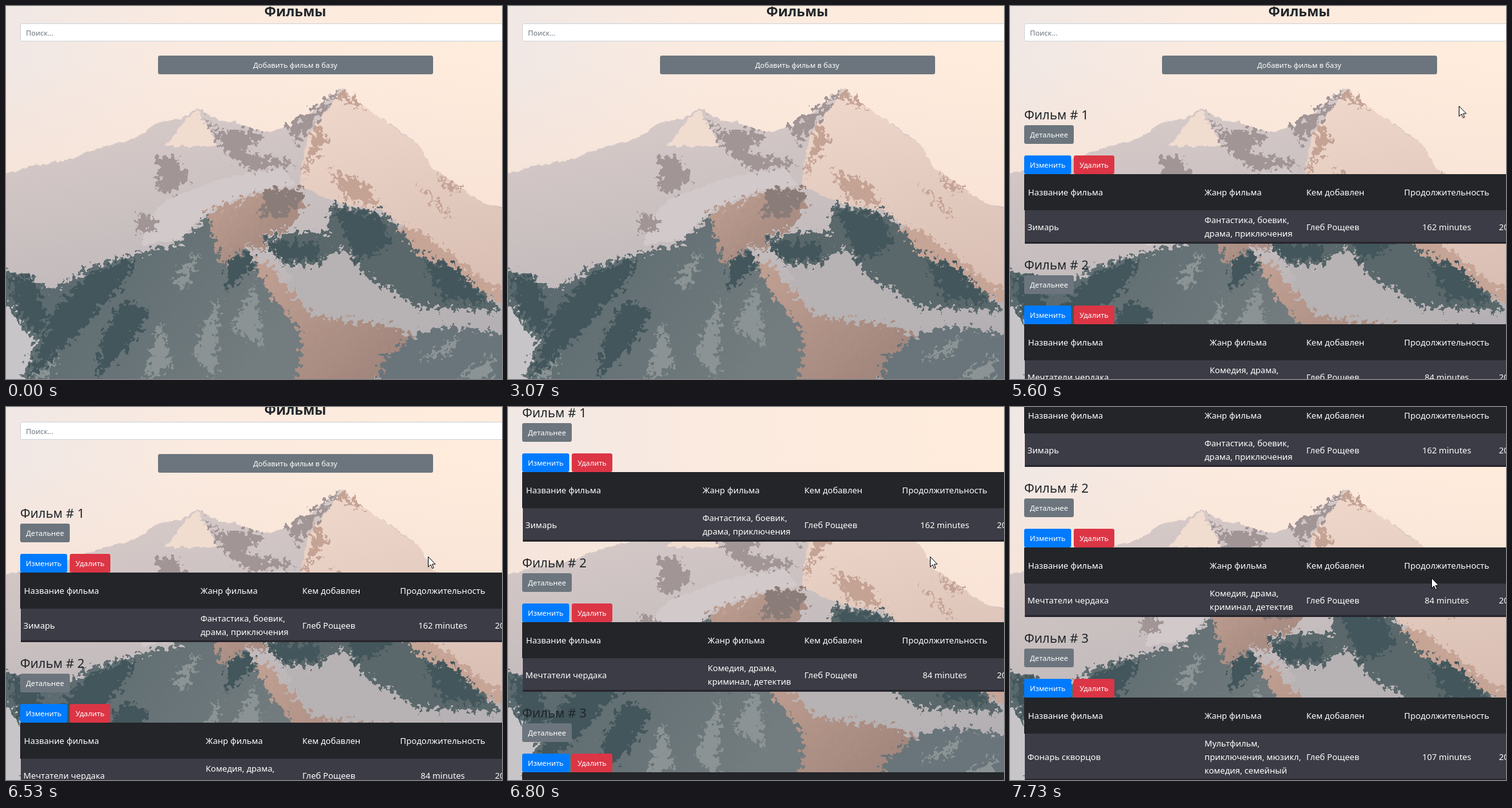
These frames come from a looping animation (770x579 px, 8 s). An HTML page:

```html
<!DOCTYPE html>
<html lang="ru">
<head>
<meta charset="utf-8">
<title>Фильмы</title>
<style>
  html, body { margin: 0; width: 100%; height: 100%; overflow: hidden; }
  body { position: relative; font: 13.1px/21px "Noto Sans", "Open Sans", sans-serif; background: #f7e8de; }
  #photo, #page, #cursor { position: absolute; left: 0; top: 0; }
  #photo { width: 770px; height: 579px; }
  #page { width: 770px; height: 900px; }
  #page, #list, #cursor { animation: 8s steps(1) -5ms infinite; }
  #page { animation-name: scroll; will-change: transform; }
  #list { animation-name: appear; }
  #cursor { animation-name: point; will-change: transform; }

  .film { position: absolute; left: 0; width: 100%; }
  .text, .box { position: absolute; white-space: nowrap; }
  .text { color: #fff; }
  .middle { transform: translate(-50%, -50%); }
  .side { transform: translateY(-50%); }
  .title { color: #212529; font-size: 21.2px; font-weight: 600; }
  .name { color: #212529; font-size: 19.6px; font-weight: 500; }
  .button { height: 29px; border-radius: 3px; color: #fff; font-size: 11.3px; line-height: 30.5px; text-align: center; }
  .grey { background: #6c757d; }
  .blue { background: #007bff; }
  .red { background: #dc3545; }
  .search { left: 22px; top: 27px; width: 800px; height: 26px; padding-left: 8px; border: 1px solid #ced4da;
    border-radius: 3px; background: #fff; color: #6c757d; font-size: 11.3px; line-height: 28px; }
  .head { left: 22px; top: 261px; width: 760px; height: 56px; background: #232529; }
  .row { left: 23px; top: 317px; width: 760px; background: #3b3c45; border-bottom: 3px solid #28262d; }

  @keyframes appear {
    0% { visibility: hidden; }
    55%, 100% { visibility: visible; }
  }
  @keyframes scroll {
    0%, 80.833% { transform: translateY(0); }
    81.667% { transform: translateY(-4px); animation-timing-function: steps(4); }
    85% { transform: translateY(-160px); animation-timing-function: steps(3); }
    87.5% { transform: translateY(-220px); animation-timing-function: steps(4); }
    90.833%, 100% { transform: translateY(-276px); }
  }
  @keyframes point {
    0% { transform: translate(790px, 600px); }
    1.667% { transform: translate(769px, 578px); }
    7.5% { transform: translate(769px, 578px); animation-timing-function: steps(6); }
    12.5% { transform: translate(735px, 520px); animation-timing-function: steps(7); }
    18.333% { transform: translate(694px, 454px); animation-timing-function: steps(5); }
    22.5% { transform: translate(664px, 340px); animation-timing-function: steps(8); }
    29.167% { transform: translate(752px, 420px); animation-timing-function: steps(2); }
    30.833% { transform: translate(720px, 453px); animation-timing-function: steps(4); }
    34.167% { transform: translate(667px, 300px); animation-timing-function: steps(5); }
    38.333% { transform: translate(772px, 133px); }
    63.333% { transform: translate(772px, 104px); animation-timing-function: steps(6); }
    68.333% { transform: translate(715px, 130px); animation-timing-function: steps(6); }
    73.333% { transform: translate(660px, 205px); }
    74.167% { transform: translate(660px, 205px); animation-timing-function: steps(2); }
    75.833% { transform: translate(657px, 212px); }
    77.5% { transform: translate(657px, 212px); animation-timing-function: steps(2); }
    79.167% { transform: translate(655px, 223px); }
    80.833% { transform: translate(655px, 232px); }
    87.5% { transform: translate(655px, 232px); animation-timing-function: steps(4); }
    90.833% { transform: translate(654px, 238px); animation-timing-function: steps(7); }
    96.667%, 100% { transform: translate(654px, 265px); }
  }
</style>
</head>
<body>
<svg id="photo" viewBox="0 0 770 579">
  <defs>
    <linearGradient id="sky">
      <stop offset="0" stop-color="#f0e8e5"/><stop offset=".4" stop-color="#fbeadf"/><stop offset="1" stop-color="#ffecdc"/>
    </linearGradient>
    <linearGradient id="haze" x2="0" y2="1">
      <stop offset=".15" stop-color="#f8e3d6" stop-opacity="0"/><stop offset=".55" stop-color="#f8e3d6"/>
    </linearGradient>
    <linearGradient id="snow" x2=".3" y2="1">
      <stop offset="0" stop-color="#ddcfcc"/><stop offset="1" stop-color="#b3afb3"/>
    </linearGradient>
    <linearGradient id="sunny" x2=".2" y2="1">
      <stop offset="0" stop-color="#f0d9cc"/><stop offset="1" stop-color="#d9bfb4"/>
    </linearGradient>
    <linearGradient id="rock" x2="1" y2=".4">
      <stop offset="0" stop-color="#536469"/><stop offset="1" stop-color="#737c7f"/>
    </linearGradient>
    <linearGradient id="warm" x2="1" y2="1">
      <stop offset="0" stop-color="#c2a193"/><stop offset="1" stop-color="#9a8078"/>
    </linearGradient>
    <filter id="crisp" x="-5%" y="-5%" width="110%" height="110%" color-interpolation-filters="sRGB">
      <feTurbulence type="fractalNoise" baseFrequency=".1" numOctaves="2" seed="4"/>
      <feDisplacementMap in="SourceGraphic" scale="8" xChannelSelector="R" yChannelSelector="G"/>
    </filter>
    <filter id="ragged" x="-5%" y="-5%" width="110%" height="110%" color-interpolation-filters="sRGB">
      <feTurbulence type="fractalNoise" baseFrequency=".13" numOctaves="3" seed="9"/>
      <feDisplacementMap in="SourceGraphic" scale="34" xChannelSelector="R" yChannelSelector="G"/>
    </filter>
  </defs>
  <rect width="770" height="579" fill="url(#sky)"/>
  <rect width="770" height="579" fill="url(#haze)"/>

  <g filter="url(#crisp)">
    <path fill="url(#snow)" d="M-20 266L40 248 90 240 140 222 200 206 235 181 272 175 297 159 330 178 355 180 400 197 440 186 470 168 490 150 522 127 548 150 575 170 605 188 640 215 660 250 700 278 740 306 790 316V600H-20Z"/>
    <path fill="url(#sunny)" d="M522 129L548 150 605 190 640 215 660 250 700 278 740 306 790 318V470L740 430 690 395 620 345 585 318 520 308 465 283 455 275 468 200 500 160Z"/>
    <path fill="#f1dcd0" d="M297 162L312 185 328 218 248 218 275 180Z"/>
    <path fill="#d2c9cb" d="M250 300L340 266 430 252 450 278 380 290 315 318 270 362 210 372 220 330Z"/>
  </g>

  <g filter="url(#ragged)">
    <g fill="#a19596">
      <path d="M302 165L330 195 385 192 400 205 372 222 376 250 350 236 330 210Z"/>
      <path d="M235 235L262 232 285 268 258 290 235 288Z"/>
      <path d="M345 225L440 240 445 250 375 255Z"/>
      <path d="M435 188L520 130 470 190 455 215Z"/>
      <path d="M205 320L228 325 236 348 205 352Z"/>
    </g>
    <g fill="#c4a395">
      <path d="M520 130L545 148 560 163 535 152 512 140Z"/>
      <path d="M480 182L500 205 475 240 460 272Z"/>
      <path d="M665 258L705 285 690 290Z"/>
      <path d="M500 255L560 275 580 312 530 300Z"/>
      <path d="M630 270L680 310 690 330Z"/>
    </g>
    <path fill="url(#rock)" d="M-20 405L25 415 75 440 140 400 185 390 270 368 315 322 325 370 345 395 370 375 390 400 405 440 440 470 470 510 460 600H20L45 520 5 470-20 440Z"/>
    <path fill="url(#warm)" d="M313 318L365 300 400 285 460 282 465 310 440 345 400 358 400 380 375 372 338 402 325 370Z"/>
    <path fill="#8a7d79" d="M400 287L460 284 462 300 430 328 395 325Z"/>
    <path fill="#5a686b" d="M398 362L440 352 500 350 505 308 585 320 620 350 640 380 690 395 730 420 765 475 700 470 640 468 560 420 523 375 480 402 430 402Z"/>
    <path fill="#b7b2b3" d="M430 405L480 405 523 375 560 420 640 468 700 490 620 505 540 490 475 475 445 440Z"/>
    <path fill="url(#warm)" d="M385 395L410 402 440 440 475 480 540 490 600 497 632 512 600 545 560 600H450L460 510 405 440Z"/>
    <path fill="#c6a496" d="M605 340L640 348 700 392 745 428 790 452V475L735 440 685 398 640 385Z"/>
    <path fill="#69757a" d="M585 548L640 508 690 495 790 512V600H575Z"/>
    <path fill="#c7c5c8" d="M-20 455L8 470 44 520 18 600H-20Z"/>
  </g>

  <g filter="url(#ragged)">
    <g fill="#42565b">
      <path d="M5 415L45 430 65 480 50 515 15 470Z"/>
      <path d="M75 470L130 415 205 390 175 440 90 530 35 579Z"/>
      <path d="M180 460L225 470 190 530 140 579 150 510Z"/>
      <path d="M340 400L378 378 385 405 345 440Z"/>
      <path d="M405 365L490 370 485 395 425 392Z"/>
      <path d="M510 315L580 325 600 370 545 395Z"/>
      <path d="M645 395L690 400 745 460 680 455Z"/>
    </g>
    <g fill="#8b9394">
      <path d="M40 579L85 540 60 579ZM215 579L240 490 258 560Z"/>
      <path d="M290 540L330 450 325 579ZM350 500L385 430 400 530Z"/>
      <path d="M255 430L300 380 280 440ZM640 550L700 515 690 540ZM700 579L760 540 750 579Z"/>
    </g>
  </g>
</svg>

<main id="page">
  <div class="text middle title" style="left:449px;top:7px">Фильмы</div>
  <div class="box search">Поиск...</div>
  <div class="box button grey" style="left:235.5px;top:77px;width:427px">Добавить фильм в базу</div>
  <div id="list"></div>
</main>

<svg id="cursor" width="13" height="20">
  <path d="M.5.5V16.3L4.2 12.8 6.7 18.6 9 17.6 6.6 12H11.5Z" fill="#fff" stroke="#000"/>
</svg>

<script>
  const films = [
    { title: "Зимарь", genre: ["Фантастика, боевик,", "драма, приключения"], genreX: 302, minutes: 162 },
    { title: "Мечтатели чердака", genre: ["Комедия, драма,", "криминал, детектив"], genreX: 310, minutes: 84 },
    { title: "Фонарь скворцов", genre: ["Мультфильм,", "приключения, мюзикл,", "комедия, семейный"], genreX: 302, minutes: 107 }
  ];
  const text = (x, y, content, kind = "side") =>
    `<div class="text ${kind}" style="left:${x}px;top:${y}px">${content}</div>`;
  const button = (x, y, width, color, label) =>
    `<div class="box button ${color}" style="left:${x}px;top:${y}px;width:${width}px">${label}</div>`;

  function filmBlock({ title, genre, genreX, minutes }, index) {
    const rowHeight = 7 + 21 * genre.length;
    const rowY = 318 + rowHeight / 2;
    return `<section class="film" style="top:${index * 233}px">
      ${text(22, 167.6, `Фильм # ${index + 1}`, "side name")}
      ${button(22, 185, 77, "grey", "Детальнее")}
      ${button(22, 232, 73, "blue", "Изменить")}
      ${button(99, 232, 63, "red", "Удалить")}
      <div class="box head"></div>
      <div class="box row" style="height:${rowHeight}px"></div>
      ${text(28, 289, "Название фильма")}
      ${text(genreX, 289, "Жанр фильма")}
      ${text(460, 289, "Кем добавлен")}
      ${text(678, 289, "Продолжительность", "middle")}
      ${text(27, rowY, title)}
      ${text(genreX, rowY, genre.join("<br>"))}
      ${text(460, rowY, "Глеб Рощеев")}
      ${text(678, rowY, `${minutes} minutes`, "middle")}
      ${text(759, rowY, "20")}
    </section>`;
  }
  document.getElementById("list").innerHTML = films.map(filmBlock).join("");
</script>
</body>
</html>
```
